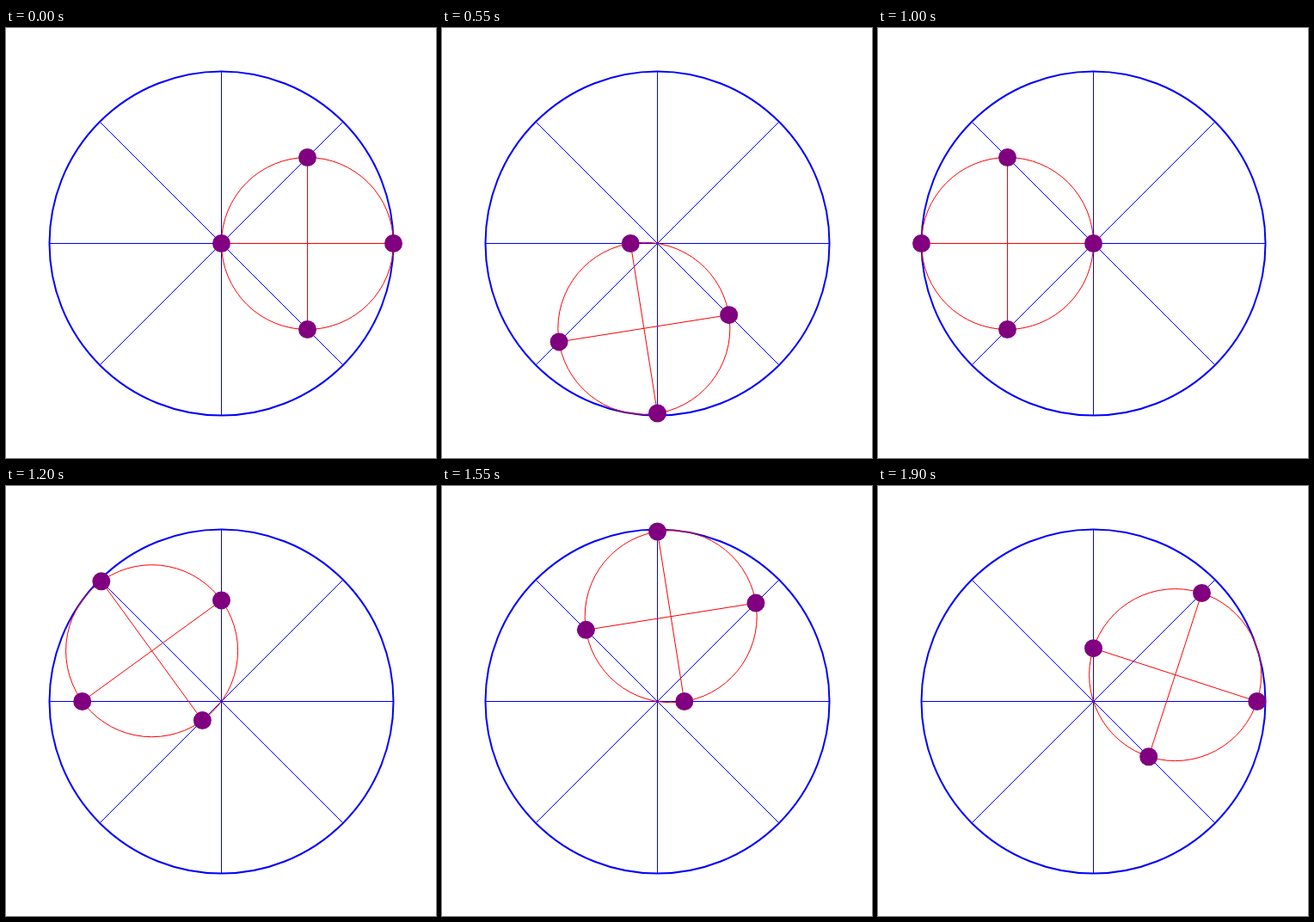
These frames come from a looping animation (500 px wide and 500 px high, 1950 ms). An HTML page with a canvas:

```html
<!DOCTYPE html>
<html>
<head>
<meta charset="utf-8">
<title>Circle rolling inside a circle</title>
<style>
  html, body { margin: 0; width: 100%; height: 100%; overflow: hidden; background: #fff; }
  canvas { display: block; }
</style>
</head>
<body>
<canvas id="stage" width="500" height="500"></canvas>
<script>
const ctx = document.getElementById('stage').getContext('2d');
const R = 200, STEP_MS = 50, STEPS = 39;
const STEP_ANGLE = Math.PI / 20;
const spokes = [0, 1, 2, 3].map(k => k * Math.PI / 4);

const polar = (r, a) => [r * Math.cos(a), r * Math.sin(a)];

function line(from, to, color) {
  ctx.beginPath();
  ctx.moveTo(...from);
  ctx.lineTo(...to);
  ctx.lineWidth = 1;
  ctx.strokeStyle = color;
  ctx.stroke();
}

function circle(center, r, color, width) {
  ctx.beginPath();
  ctx.arc(...center, r, 0, 2 * Math.PI);
  if (width) {
    ctx.lineWidth = width;
    ctx.strokeStyle = color;
    ctx.stroke();
  } else {
    ctx.fillStyle = color;
    ctx.fill();
  }
}

function draw(angle) {
  ctx.setTransform(1, 0, 0, 1, 0, 0);
  ctx.fillStyle = '#fff';
  ctx.fillRect(0, 0, 500, 500);
  ctx.translate(250.5, 250.5);

  circle([0, 0], R, '#00f', 2);
  for (const a of spokes) line(polar(-R, a), polar(R, a), '#00f');

  // Each point of the rolling circle slides along its own spoke.
  const dots = spokes.map(a => polar(R * Math.cos(angle - a), a));
  circle(polar(R / 2, angle), R / 2, '#f00', 1);
  line(dots[0], dots[2], '#f00');
  line(dots[1], dots[3], '#f00');
  for (const dot of dots) circle(dot, 10.5, '#800080');
}

const start = performance.now();
function tick() {
  const step = Math.floor((performance.now() - start) / STEP_MS) % STEPS;
  draw(step * STEP_ANGLE);
  requestAnimationFrame(tick);
}
tick();
</script>
</body>
</html>
```
